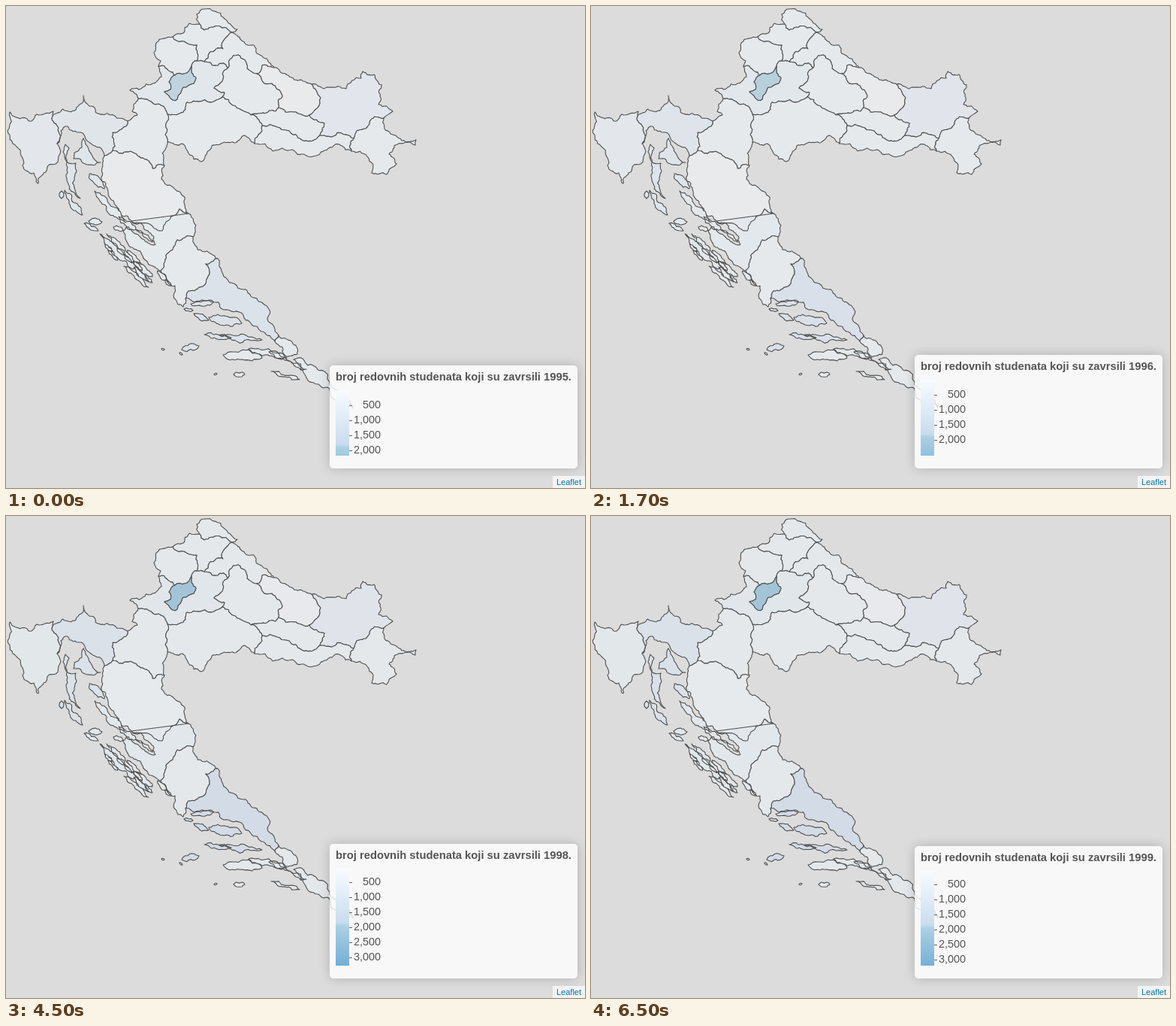
An HTML page that plays this animation: 771x641 px, repeating every 8 s.

```html
<!DOCTYPE html>
<html lang="hr">
<head>
<meta charset="utf-8">
<style>
html, body { margin: 0; width: 100%; height: 100%; overflow: hidden; background: #dcdcdc; }
body { position: relative; font-family: Arial, "Liberation Sans", sans-serif; }
svg { position: absolute; left: 0; top: 0; }
path { stroke: #505050; stroke-width: 1.1; stroke-linejoin: round; }
#legend { position: absolute; left: 431px; width: 330px; background: rgba(255,255,255,.8);
  border-radius: 5px; box-shadow: 0 0 15px rgba(0,0,0,.2); color: #555; font-size: 14.4px; }
#legend * { position: absolute; white-space: nowrap; line-height: 16px; }
#legend b { left: 8px; top: 7px; font-size: 14.75px; }
#legend i { left: 8px; top: 33px; bottom: 17px; width: 18px;
  background: linear-gradient(#f8fbff, #e4eff8 30px, #c9dcee 72px, #acd0e4 76px, #70add6 131px); }
#legend span { right: 262px; }
#legend u { left: 26px; width: 4px; height: 1px; background: #666; }
#credit { position: absolute; right: 0; bottom: 0; width: 38px; height: 16px; padding-left: 5px;
  background: rgba(255,255,255,.7); color: #0078a8; font-size: 11px; line-height: 16px; }
</style>
</head>
<body>
<svg id="map" width="771" height="641"></svg>
<div id="legend"></div>
<div id="credit">Leaflet</div>
<script>
const map = document.getElementById("map"), legend = document.getElementById("legend");
const arcs = {}, regions = {};
const noise = (x, y) => { const n = Math.sin(x * 12.99 + y * 78.23) * 43758.5; return n - Math.floor(n) - .5; };

// Splits a segment with small repeatable bends.
function bend(a, b, out) {
  const dx = b[0] - a[0], dy = b[1] - a[1];
  if (Math.hypot(dx, dy) < 4) return out.push(b);
  const k = .4 * noise(a[0] + b[0], a[1] + b[1]);
  const mid = [(a[0] + b[0]) / 2 - dy * k, (a[1] + b[1]) / 2 + dx * k];
  bend(a, mid, out);
  bend(mid, b, out);
}
function rough(pts) {
  const out = [pts[0]];
  for (let i = 1; i < pts.length; i++) bend(pts[i - 1], pts[i], out);
  return out;
}
const points = text => text.split(" ").map(p => p.split(",").map(Number));
const ring = pts => "M" + pts.map(p => p.map(v => v.toFixed(1))).join("L") + "Z";
const arc = (name, text) => arcs[name] = rough(points(text));

// A spindle from one tip to the other.
function isle(x1, y1, x2, y2, width) {
  const dx = x2 - x1, dy = y2 - y1, len = Math.hypot(dx, dy);
  const at = (t, side) => [x1 + dx * t - dy / len * side * width / 2, y1 + dy * t + dx / len * side * width / 2];
  return ring(rough([at(0, 0), at(.25, 1), at(.75, 1), at(1, 0), at(.75, -1), at(.25, -1), at(0, 0)]));
}
// Islets lying parallel to the coast.
function islets(count, x1, y1, x2, y2, spread) {
  return Array.from({ length: count }, (_, i) => {
    const t = i / (count - 1), off = spread * noise(i, 3), len = 7 + 6 * noise(i, 5);
    const x = x1 + (x2 - x1) * t + off, y = y1 + (y2 - y1) * t - off;
    return isle(x - len, y - len, x + len, y + len, 4);
  });
}
function region(name, names, ...isles) {
  const outline = names.split(" ").flatMap(n => n[0] === "-" ? [...arcs[n.slice(1)]].reverse() : arcs[n]);
  const path = document.createElementNS("http://www.w3.org/2000/svg", "path");
  path.setAttribute("d", ring(outline) + isles.join(""));
  map.append(regions[name] = path);
}

// Borders are shared, so each is described once by its key points.
arc("medOut", "258,24 254,11 264,4 290,16 308,31 301,35");
arc("medVar", "258,24 264,32 301,35");
arc("varOut", "222,41 236,36 244,23 258,24");
arc("varKra", "222,41 227,46 254,52 254,73");
arc("varZag", "254,73 264,74");
arc("varKop", "264,74 271,62 289,57 301,35");
arc("kraOut", "203,80 206,73 197,62 200,49 222,41");
arc("kraZagW", "203,80 211,80 225,92");
arc("kraCity", "225,92 247,80");
arc("kraZagE", "247,80 254,73");
arc("cityZag", "247,80 253,96 250,103 236,108 228,124 222,125 211,114 219,111 217,101 225,92");
arc("kopOut", "301,35 313,45 330,52 343,69 357,82");
arc("kopVir", "357,82 341,79 334,90");
arc("kopBje", "296,82 298,71 309,65 321,83 334,90");
arc("zagKop", "264,74 293,78 296,82");
arc("zagBje", "296,82 286,102 277,109 291,115 288,121");
arc("zagOut", "203,80 207,94 165,112 176,123");
arc("zagKar", "176,123 193,127 209,133 215,144");
arc("zagSis", "215,144 231,143 241,128 288,121");
arc("virOut", "357,82 372,90 407,104");
arc("virOsi", "407,104 419,122 404,145");
arc("bjeVir", "334,90 354,103 368,119 363,135");
arc("bjePoz", "363,135 359,140 326,145");
arc("virPoz", "363,135 404,145");
arc("bjeSis", "288,121 302,132 326,145");
arc("osiOut", "407,104 453,110 473,96 475,87 490,91 499,122 496,131 515,140 503,149");
arc("osiPoz", "404,145 424,156 418,172");
arc("osiBro", "418,172 463,176");
arc("osiVuk", "503,149 487,150 484,157 467,166 463,176");
arc("vukBro", "463,176 460,193");
arc("vukOut", "503,149 511,168 546,178 545,185 521,184 510,197 520,210 507,224 487,222 489,211 481,200 460,193");
arc("sisPoz", "326,145 341,159");
arc("sisBro", "341,159 331,183");
arc("pozBro", "341,159 361,161 386,171 402,180 418,172");
arc("broOut", "460,193 430,189 402,200 381,191 331,183");
arc("sisOut", "331,183 317,172 308,180 274,186 260,207 243,196 235,183 215,181");
arc("sisKar", "215,144 212,171 215,181");
arc("karOut", "176,123 168,140 175,145 162,153");
arc("karPri", "162,153 142,168 142,192");
arc("karLik", "142,192 160,194 195,216 211,212");
arc("karEast", "215,181 211,212");
arc("istTop", "5,141 34,153 41,144 63,140 62,147");
arc("istPri", "62,147 70,162 68,183");
arc("istSea", "68,183 66,210 50,222 43,236 37,222 22,212 14,187 5,141");
arc("priOut", "62,147 93,138 103,119 108,130 162,153");
arc("priLik", "142,192 131,199");
arc("priSea", "68,183 73,166 82,160 99,168 113,183 131,199");
arc("likOut", "211,212 207,230 231,247 243,276");
arc("likZad", "243,276 231,270 213,287 208,299 167,286");
arc("likSea", "131,199 133,236 167,286");
arc("zadOut", "243,276 252,298 249,307");
arc("zadSib", "249,307 228,311 213,336 206,352");
arc("zadSea", "167,286 197,308 195,314 160,294 156,299 181,331 206,352");
arc("sibOut", "249,307 282,336");
arc("sibSpl", "282,336 266,343 271,357 262,373 243,379 239,389");
arc("sibSea", "206,352 225,372 229,397 236,400 239,389");
arc("splOut", "282,336 316,377 350,403 348,416 363,438");
arc("splDub", "363,438 358,446");
arc("splSea", "239,389 271,391 290,404 316,411 326,422 358,446");
arc("dubOut", "363,438 382,449 388,463 372,465 358,446");

region("med", "medOut -medVar");
region("var", "varOut medVar -varKop -varZag -varKra");
region("kra", "kraOut varKra -kraZagE -kraCity -kraZagW");
region("zag", "kraZagW -cityZag kraZagE varZag zagKop zagBje -zagSis -zagKar -zagOut");
region("city", "kraCity cityZag");
region("kop", "varKop kopOut kopVir -kopBje -zagKop");
region("bje", "kopBje bjeVir bjePoz -bjeSis -zagBje");
region("vir", "kopVir bjeVir virPoz -virOsi -virOut");
region("osi", "osiOut osiVuk -osiBro -osiPoz -virOsi");
region("vuk", "vukOut -vukBro -osiVuk");
region("poz", "virPoz osiPoz -pozBro -sisPoz -bjePoz");
region("bro", "pozBro osiBro vukBro broOut -sisBro");
region("sis", "zagSis bjeSis sisPoz sisBro sisOut -sisKar");
region("kar", "zagKar sisKar karEast -karLik -karPri -karOut");
region("ist", "istTop istPri istSea");
region("lik", "karLik likOut likZad -likSea -priLik");
region("pri", "priOut karPri priLik -priSea -istPri",
  ring(rough(points("90,203 91,195 101,188 103,176 108,186 126,208 119,211 108,211 90,203"))),
  ring(rough(points("79,184 84,189 81,207 93,209 91,228 99,256 81,232 82,222 76,194 79,184"))),
  isle(78, 245, 102, 278, 8), isle(74, 246, 74, 256, 5), isle(111, 223, 131, 243, 9));
region("zad", "likZad zadOut zadSib -zadSea",
  isle(118, 246, 160, 288, 9), isle(150, 280, 199, 317, 8), isle(110, 286, 128, 287, 7),
  isle(143, 294, 156, 298, 6), isle(104, 289, 123, 299, 5), isle(125, 303, 180, 358, 8),
  isle(134, 303, 178, 346, 7), isle(172, 340, 195, 360, 6));
region("sib", "zadSib sibSea -sibSpl -sibOut",
  isle(157, 346, 190, 374, 5), ...islets(9, 140, 318, 212, 372, 16));
region("spl", "splOut splDub -splSea -sibSpl",
  isle(246, 396, 276, 394, 6), isle(250, 409, 270, 418, 5), isle(237, 403, 249, 405, 4),
  isle(270, 414, 314, 422, 12), isle(264, 437, 300, 441, 7), isle(284, 438, 341, 444, 5),
  isle(234, 457, 257, 452, 8), isle(207, 456, 211, 457, 2), isle(231, 461, 235, 464, 2));
region("dub", "dubOut -splDub",
  isle(289, 464, 341, 468, 10), isle(323, 456, 374, 468, 7), isle(350, 460, 400, 483, 6),
  ring(rough(points("383,470 396,470 402,478 431,500 452,514 462,535 428,507 396,487 383,470"))),
  isle(353, 486, 391, 497, 6), isle(303, 490, 318, 490, 6), isle(277, 490, 281, 489, 2));

// Shade in the first year and the last.
const shades = {
  city: ["#c0d4de", "#a3c4d7"], spl: ["#dbe2ea", "#d3dbe6"], pri: ["#e0e5ea", "#dae1e9"],
  osi: ["#e2e6ec", "#e0e4ea"], zag: ["#e1e7ea", "#e0e6e9"], lik: ["#e9eaec", "#e6eaec"],
  vir: ["#e9eaec", "#e8e9ed"], zad: ["#e4e9ec", "#e2e7eb"], ist: ["#e3e7ec", "#e2e7ea"]
};
const growth = [0, .28, .79, 1, 1];
const zeroY = [511, 497, 481, 469, 472];

function show(year) {
  for (const name in regions) {
    const [from, to] = shades[name] || ["#e5e9ec", "#e4e8eb"];
    regions[name].style.fill = `color-mix(in srgb, ${to} ${growth[year] * 100}%, ${from})`;
  }
  const top = zeroY[year] - 33, ticks = Math.floor((596 - zeroY[year]) / 20);
  legend.style.top = top + "px";
  legend.style.height = 615 - top + "px";
  let html = `<b>broj redovnih studenata koji su zavrsili ${1995 + year}.</b><i></i>`;
  for (let k = 1; k <= ticks; k++) {
    const y = (year < 2 ? 33 : 31) + 20 * k;
    html += `<u style="top:${y}px"></u><span style="top:${y - 9}px">${(500 * k).toLocaleString("en-US")}</span>`;
  }
  legend.innerHTML = html;
}

let shown = -1;
function tick() {
  const year = Math.floor((performance.now() % 8000 + 1500) / 2000);
  if (year !== shown) show(shown = year);
  requestAnimationFrame(tick);
}
tick();
</script>
</body>
</html>
```
